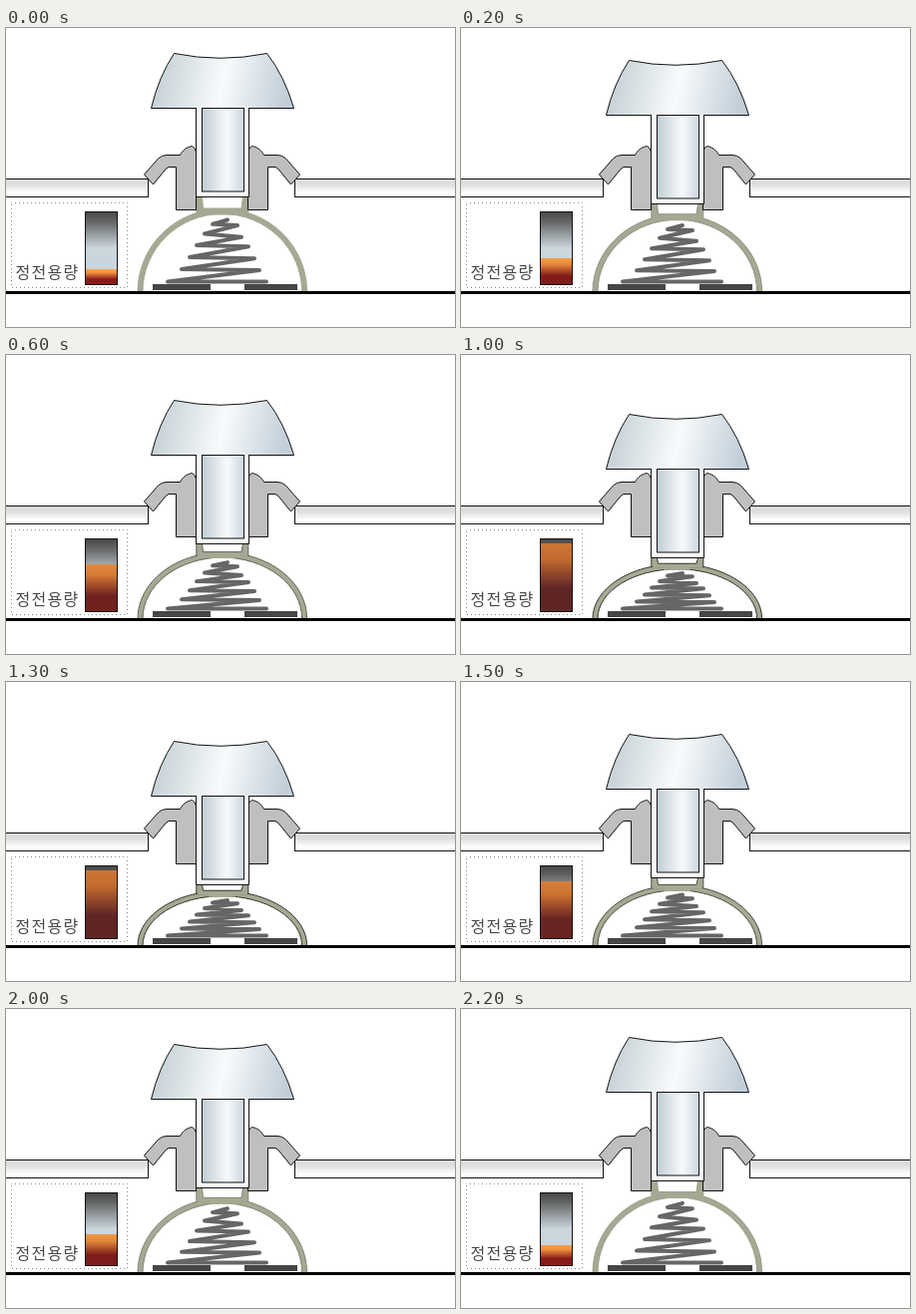
Animation of 450x300 px, one loop 2300 ms. Source, as an HTML page:

```html
<!DOCTYPE html>
<html lang="ko">
<head>
<meta charset="utf-8">
<style>
  html, body { margin: 0; width: 100%; height: 100%; overflow: hidden; background: #fff; }
  svg { display: block; width: 100vw; height: 100vh; }
  text { font: 300 16px "Noto Sans CJK KR", "Noto Sans CJK", sans-serif; letter-spacing: .08em; fill: #484848; }
</style>
</head>
<body>
<svg viewBox="0 0 450 300">
  <defs>
    <linearGradient id="plate" x2="0" y2="1">
      <stop stop-color="#dadada"/><stop offset=".3" stop-color="#dedede"/><stop offset=".8" stop-color="#fff"/>
    </linearGradient>
    <linearGradient id="capFill" y2=".08">
      <stop stop-color="#bfcbd0"/><stop offset=".54" stop-color="#f8fbfc"/><stop offset="1" stop-color="#c2ced8"/>
    </linearGradient>
    <linearGradient id="coreFill">
      <stop stop-color="#c0cdd3"/><stop offset=".6" stop-color="#f7fafc"/><stop offset="1" stop-color="#ccd6df"/>
    </linearGradient>
    <linearGradient id="steel" x2="0" y2="1">
      <stop stop-color="#484848"/><stop offset=".12" stop-color="#606161"/><stop offset=".5" stop-color="#ccd6dd"/><stop offset="1" stop-color="#c6d2da"/>
    </linearGradient>
    <linearGradient id="heat" x2="0" y2="1">
      <stop id="hot"/><stop id="warm" offset=".22"/><stop id="cold" offset=".66"/>
    </linearGradient>
    <path id="arm" d="M138.500 147L152.500 131Q156 127.500 161 127.500H174.500C177 122.500 181 119.500 186.500 118.500Q189.500 120 190.500 124V182.500H170.500V139.500H163Q160.500 140.500 158 144L147.500 157Z" fill="#bfbfbf" stroke="#111"/>
  </defs>

  <g fill="url(#plate)" stroke="#111">
    <rect x="-2" y="151.500" width="144.500" height="18"/>
    <rect x="289.500" y="151.500" width="164" height="18"/>
  </g>
  <rect x="5.500" y="175.500" width="116" height="85" fill="none" stroke="#888" stroke-dasharray="1 3" stroke-dashoffset=".5"/>
  <text x="9.500" y="251">정전용량</text>

  <rect x="79.500" y="184.500" width="32" height="73" fill="url(#steel)"/>
  <rect id="level" x="79.500" width="32" fill="url(#heat)"/>
  <rect x="79.500" y="184.500" width="32" height="73" fill="none" stroke="#111"/>

  <path d="M147 260H205M239 260H292" stroke="#464646" stroke-width="6"/>
  <path id="spring" fill="none" stroke="#666" stroke-width="4" stroke-linecap="round" stroke-linejoin="round"/>
  <g id="rubber" fill="#a5a994">
    <path id="dome"/>
    <path id="neck"/>
    <path id="bump" stroke="none"/>
  </g>
  <path d="M0 265.500H450" stroke="#000" stroke-width="3"/>

  <use href="#arm"/>
  <use href="#arm" transform="matrix(-1 0 0 1 433 0)"/>
  <g id="key" stroke="#111">
    <path d="M168.500 25.500Q215 35 261.500 25.500Q279 48 288.500 80.500H145.500Q153 49 168.500 25.500Z" fill="url(#capFill)"/>
    <path d="M190.500 80V169.500H243.500V80" fill="#f8fafa"/>
    <path d="M191 80.500H243" stroke="#f4f8f8"/>
    <rect x="196.500" y="80.500" width="42" height="83.500" fill="url(#coreFill)"/>
  </g>
</svg>
<script>
const STEP = 100, STEPS = 23, TURN = 11;
const $ = id => document.getElementById(id);
const set = (id, attrs) => {
  for (const name in attrs) $(id).setAttribute(name, attrs[name]);
};
const mix = (a, b, p) => `rgb(${a.map((v, i) => Math.round(v + (b[i] - v) * p))})`;

// Coil corners: x and relative height from top (0) to base (1)
const coil = [
  [222, 0], [207, .07], [232, .09], [199, .225], [236, .28], [191, .41],
  [243, .43], [184, .605], [249, .625], [176, .8], [254, .815], [162, 1], [261, 1]
];

function draw(time) {
  const k = Math.floor(time / STEP) % STEPS;
  const n = Math.min(k, STEPS - k);
  const p = n / TURN;
  const press = Math.round(n * 3.4);

  set('key', { transform: `translate(0 ${press})` });

  const levelY = Math.max(184.5, Math.round(242 - n * 5.3));
  set('level', { y: levelY, height: 257.5 - levelY });
  set('hot', { 'stop-color': mix([255, 166, 76], [200, 112, 48], p) });
  set('warm', { 'stop-color': mix([240, 146, 62], [192, 104, 46], p) });
  set('cold', { 'stop-color': mix([138, 26, 24], [92, 38, 38], p) });

  const springTop = 192.5 + press * .78;
  const points = coil.map(([x, v]) => `${x} ${springTop + (254.5 - springTop) * v}`);
  set('spring', { d: 'M' + points.join('L') });

  const top = 181.5 + press * .83;
  const stemEnd = 169.5 + press;
  const outer = 264.5 - top;
  set('rubber', { stroke: mix([165, 169, 148], [40, 44, 32], p) });
  set('dome', {
    d: `M132 264.5A84.8 ${outer} 0 0 1 301.600 264.5H296.600A79.800 ${outer - 5} 0 0 0 137 264.5Z`
  });
  set('neck', {
    d: `M190.800 ${stemEnd}V${top + 3}H242.800V${stemEnd}H237.500L236 ${top - .5}H197.500L196.500 ${stemEnd}Z`
  });
  set('bump', { d: `M192 ${top + .8}H242V${top + 3.8}H230V${top + 6}H203V${top + 3.8}H192Z` });
}

const start = performance.now();
function tick() {
  draw(performance.now() - start);
  requestAnimationFrame(tick);
}
tick();
</script>
</body>
</html>
```
